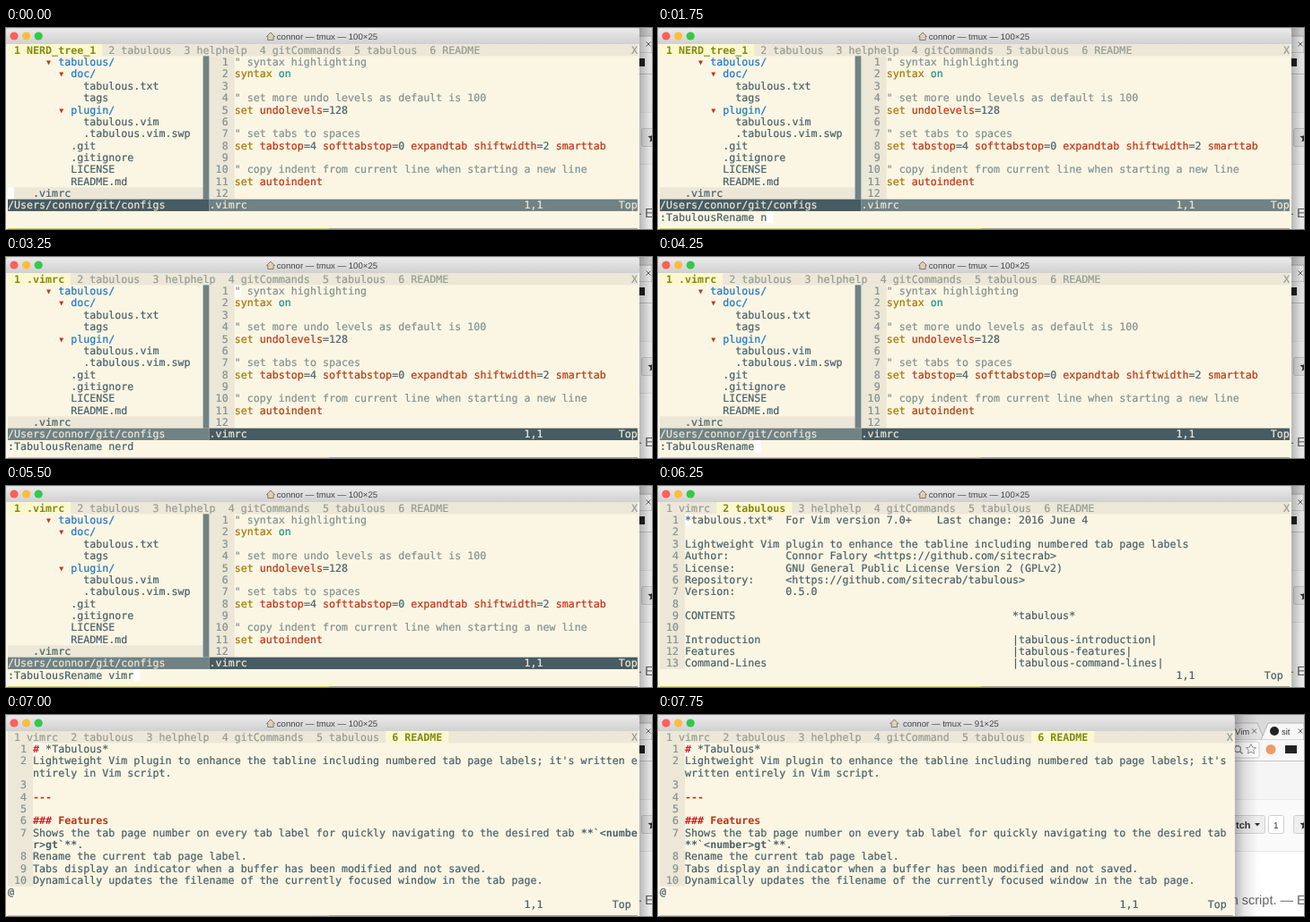
Recreate the animation shown at these times as an HTML page. Size 720 px wide and 225 px high, loop 8 s.

```html
<!DOCTYPE html>
<html lang="en">
<head>
<meta charset="utf-8">
<title>Tab labels in a terminal editor</title>
<style>
  html, body { margin: 0; width: 100%; height: 100%; overflow: hidden; background: #ececec; }
  svg { display: block; width: 720px; height: 225px; }
  text { white-space: pre; text-rendering: geometricPrecision; }
  .mono { font: 11.66px "DejaVu Sans Mono", monospace; stroke-width: .22px; }
  .bold { font-weight: bold; stroke-width: 0; }
  .ui { font-family: "Liberation Sans", sans-serif; }
</style>
</head>
<body>
<svg viewBox="0 0 720 225" xmlns="http://www.w3.org/2000/svg">
  <defs>
    <linearGradient id="bar" x1="0" y1="0" x2="0" y2="1">
      <stop offset="0" stop-color="#ebebeb"/><stop offset="1" stop-color="#d0d0d0"/>
    </linearGradient>
    <linearGradient id="shade">
      <stop offset="0" stop-opacity=".28"/><stop offset=".4" stop-opacity=".1"/><stop offset="1" stop-opacity="0"/>
    </linearGradient>
  </defs>
  <g id="browser" class="ui">
    <rect width="720" height="225" fill="#fff"/>
    <rect width="720" height="28" fill="#dadada"/>
    <path d="M600 28L606 9H668L676 28Z" fill="#e4e4e4" stroke="#b4b4b4"/>
    <path d="M672 28L680 9H720V28Z" fill="#f7f7f7" stroke="#b4b4b4"/>
    <rect y="28" width="720" height="24" fill="#f7f7f7"/>
    <text x="643" y="21.500" font-size="9.500" fill="#444">Vim</text>
    <circle cx="687" cy="18" r="5" fill="#222"/>
    <text x="695" y="21.500" font-size="9.500" fill="#333">sit</text>
    <path d="M662 15.500l5 5m0-5l-5 5M713.500 15.500l5 5m0-5l-5 5" stroke="#666" fill="none"/>
    <rect x="600" y="30" width="70" height="18" rx="2" fill="#fff" stroke="#ccc"/>
    <circle cx="646" cy="38" r="3.500" fill="none" stroke="#888" stroke-width="1.300"/>
    <path d="M648.500 40.500l3 3" stroke="#888" stroke-width="1.500"/>
    <path d="M661 32.500l1.700 3.600 3.900.5-2.900 2.700.8 3.900-3.500-1.900-3.500 1.900.8-3.900-2.900-2.700 3.900-.5z" fill="none" stroke="#999"/>
    <circle cx="683" cy="38.500" r="5.500" fill="#ee9a6a"/>
    <rect x="699" y="34" width="13" height="9" fill="#222"/>
    <rect y="51" width="720" height="1" fill="#c8c8c8"/>
    <rect y="52" width="720" height="42" fill="#f5f5f5"/>
    <rect y="94" width="720" height="58" fill="#fafafa"/>
    <rect y="94" width="720" height="1" fill="#e8e8e8"/>
    <rect y="152" width="720" height="1" fill="#e8e8e8"/>
    <g fill="#eee" stroke="#d0d0d0">
      <rect x="620.500" y="112.500" width="56" height="20" rx="2"/>
      <rect x="680.500" y="112.500" width="17" height="20" rx="2" fill="#fff"/>
      <rect x="708.500" y="112.500" width="30" height="20" rx="2"/>
    </g>
    <text x="644" y="126.500" font-size="11" font-weight="bold" fill="#333">tch</text>
    <path d="M665 121h6l-3 3.500z" fill="#333"/>
    <text x="686" y="126.500" font-size="10" fill="#333">1</text>
    <path d="M721 117l1.600 3.800 4 .3-3 2.700.9 4-3.500-2.200-3.500 2.200.9-4-3-2.700 4-.3z" fill="#333"/>
    <text x="712" y="211.500" font-size="14.500" fill="#666" text-anchor="end">n script. — </text>
    <text x="712" y="211.500" font-size="14.500" fill="#666">E</text>
  </g>
  <g id="win"></g>
</svg>
<script>
const CW = 7.019, RH = 13.36, LEFT = 2, TOP = 18;
const C = {
  paper: '#fbf6e4', shade: '#ece7d7', text: '#4b6269', dim: '#849291', tab: '#959d95',
  yellow: '#a57706', red: '#d11c24', orange: '#bd3613', blue: '#2176c7', cyan: '#259286',
  olive: '#858a10', sel: '#fbf8d0', on: '#475b62', off: '#708284', cursor: '#ffffff'
};
const STEP = 250, STEPS = 32, CMD = ':TabulousRename';
const win = document.getElementById('win');

const esc = s => s.replace(/&/g, '&amp;').replace(/</g, '&lt;');
const colX = c => LEFT + c * CW;
const rowY = r => TOP + r * RH;
const rect = (x, y, w, h, fill) => `<rect x="${x}" y="${y}" width="${w}" height="${h}" fill="${fill}"/>`;
const cell = (c, r, n, fill, rows = 1) => rect(colX(c), rowY(r), n * CW, RH * rows, fill);
const put = (c, r, s, fill = C.text, bold = false) =>
  `<text class="mono${bold ? ' bold' : ''}" x="${colX(c)}" y="${rowY(r) + 10.7}" fill="${fill}" stroke="${fill}">${esc(s)}</text>`;

// Each tree entry: column, label, is it a folder
const tree = [
  [8, 'tabulous/', 1], [10, 'doc/', 1], [12, 'tabulous.txt'], [12, 'tags'],
  [10, 'plugin/', 1], [12, 'tabulous.vim'], [12, '.tabulous.vim.swp'], [10, '.git'],
  [10, '.gitignore'], [10, 'LICENSE'], [10, 'README.md'], [4, '.vimrc']
];
const vimrc = [
  '" syntax highlighting', 'syntax on', '', '" set more undo levels as default is 100',
  'set undolevels=128', '', '" set tabs to spaces',
  'set tabstop=4 softtabstop=0 expandtab shiftwidth=2 smarttab', '',
  '" copy indent from current line when starting a new line', 'set autoindent', ''
];
const entry = (a, b) => a.padEnd(52) + b;
const field = (a, b) => a.padEnd(16) + b;
const help = [
  '*tabulous.txt*  For Vim version 7.0+    Last change: 2016 June 4', '',
  'Lightweight Vim plugin to enhance the tabline including numbered tab page labels',
  field('Author:', 'Connor Falory <https://github.com/sitecrab>'),
  field('License:', 'GNU General Public License Version 2 (GPLv2)'),
  field('Repository:', '<https://github.com/sitecrab/tabulous>'),
  field('Version:', '0.5.0'), '',
  entry('CONTENTS', '*tabulous*'), '',
  entry('Introduction', '|tabulous-introduction|'),
  entry('Features', '|tabulous-features|'),
  entry('Command-Lines', '|tabulous-command-lines|')
];
const readme = [
  '# *Tabulous*',
  "Lightweight Vim plugin to enhance the tabline including numbered tab page labels; it's written entirely in Vim script.",
  '', '---', '', '### Features',
  'Shows the tab page number on every tab label for quickly navigating to the desired tab **`<number>gt`**.',
  'Rename the current tab page label.',
  'Tabs display an indicator when a buffer has been modified and not saved.',
  'Dynamically updates the filename of the currently focused window in the tab page.'
];

function stateAt(n) {
  const s = { cols: 100, tab: 1, label: 'NERD_tree_1', cmd: '', focus: 'tree' };
  const type = (k, head, arg) => k <= head ? CMD.slice(0, k) : CMD + arg.slice(0, k - head - 1);
  if (n > 0) s.cmd = n < 14 ? type(n, 4, ' nerd') : type(n - 13, 3, ' vimrc');
  if (n >= 11) s.label = 'nerd';
  if (n >= 13) s.label = '.vimrc';
  if (n >= 24) s.label = 'vimrc';
  s.right = n >= 13;
  if (n >= 13) s.focus = 'edit';
  if ((n >= 1 && n <= 10) || (n >= 14 && n <= 23)) s.focus = 'cmd';
  if (n >= 25) s.tab = [2, 3, 5, 6][Math.min(n - 25, 3)];
  if (n >= 29) s.cols = [98, 94, 91][n - 29];
  return s;
}

function frame(s) {
  const w = s.cols * CW + 4, mid = w / 2;
  const house = `<path d="M${mid - 62.500} 9.500l4.500-4.500 4.500 4.500h-1.300v4h-6.400v-4z" ` +
    'fill="#dccfbb" stroke="#83705a" stroke-width=".9"/>';
  const lights = ['#fc605b', '#fdbc40', '#34c84a'].map((c, i) =>
    `<circle cx="${9 + i * 13.6}" cy="9" r="4.600" fill="${c}"/>`).join('');
  const half = colX(Math.floor(s.cols / 2) + 1);
  return rect(w, 0, 26, 225, 'url(#shade)') +
    `<path d="M0 ${TOP}V5Q0 .5 5 .5H${w - 5}Q${w} .5 ${w} 5V${TOP}Z" fill="url(#bar)"/>` +
    rect(0, TOP, w, 225 - TOP, C.paper) + lights + house +
    `<text class="ui" x="${mid + 5}" y="12.600" font-size="9.600" text-anchor="middle" fill="#444">` +
    `connor — tmux — ${s.cols}×25</text>` +
    rect(LEFT, 224, half - LEFT, 1, '#d8cd72') + rect(half, 224, w - half - 2, 1, '#a9a58e');
}

function tabs(s) {
  const max = Math.floor(s.cols / 6) - 5;
  let out = cell(0, 0, s.cols, C.shade), c = 0;
  [s.label, 'tabulous', 'helphelp', 'gitCommands', 'tabulous', 'README'].forEach((name, i) => {
    const label = `${i + 1} ${name.slice(0, max)}`, on = s.tab === i + 1;
    const n = label.length + 2;
    if (on) out += cell(c, 0, n, C.sel);
    out += put(c + 1, 0, label, on ? C.olive : C.tab, on);
    c += n;
  });
  return out + put(s.cols - 1, 0, 'X', C.tab);
}

const lineNo = (c, r, n) => put(c, r, String(n).padStart(3), C.dim);

function vimLine(c, r, s) {
  if (s[0] === '"') return put(c, r, s, C.dim);
  let out = '';
  s.replace(/=\d+|\w+/g, (word, at) => {
    const fill = at === 0 ? C.yellow : word === 'on' ? C.cyan : word[0] === '=' ? C.text : C.orange;
    out += put(c + at, r, word, fill);
  });
  return out;
}

function split(s) {
  let out = cell(0, 12, 31, C.shade) + cell(31, 1, 1, C.off, 12) + cell(32, 1, 4, C.shade, 12);
  if (s.focus === 'tree') out += cell(0, 12, 1, C.cursor);
  if (s.focus === 'edit') out += cell(36, 1, 1, C.cursor);
  tree.forEach(([c, name, dir], i) => {
    if (dir) out += put(c - 2, i + 1, '▾', C.orange);
    out += put(c, i + 1, name, dir ? C.blue : C.text);
  });
  vimrc.forEach((line, i) => { out += lineNo(32, i + 1, i + 1) + vimLine(36, i + 1, line); });
  out += cell(0, 13, 32, s.right ? C.off : C.on) + cell(32, 13, 68, s.right ? C.on : C.off);
  out += put(0, 13, '/Users/connor/git/configs', C.shade) + put(32, 13, '.vimrc', C.shade) +
    put(82, 13, '1,1', C.shade) + put(97, 13, 'Top', C.shade);
  if (s.focus === 'cmd') out += cell(s.cmd.length, 14, 1, C.cursor);
  return out + put(0, 14, s.cmd);
}

function docLine(r, s, md) {
  if (!md) return put(4, r, s);
  if (s === '---') return put(4, r, s, C.orange, true);
  if (s.startsWith('###')) return put(4, r, '###', C.red, true) + put(8, r, s.slice(4), C.orange, true);
  if (s[0] === '#') return put(4, r, '#', C.red, true) + put(6, r, s.slice(2));
  const a = s.search(/\*\*`|r>gt/);
  if (a < 0) return put(4, r, s);
  return put(4, r, s.slice(0, a)) + put(4 + a, r, s.slice(a).replace(/\.$/, ''), C.text, true) +
    (s.endsWith('.') ? put(3 + s.length, r, '.') : '');
}

function page(s) {
  const md = s.tab === 6, wide = s.cols - 4;
  let r = 1, out = cell(0, 1, 4, C.shade, md ? 12 : 13) + cell(4, 1, 1, C.cursor);
  (md ? readme : help).forEach((line, i) => {
    out += lineNo(0, r, i + 1);
    for (let p = 0; p === 0 || p < line.length; p += wide) out += docLine(r++, line.slice(p, p + wide), md);
  });
  if (md) out += put(0, 13, '@');
  return out + put(s.cols - 18, 14, '1,1') + put(s.cols - 4, 14, 'Top');
}

let last = -1;
const start = performance.now();
function draw(now) {
  const n = Math.floor(Math.max(0, now - start) / STEP) % STEPS;
  if (n !== last) {
    const s = stateAt(n);
    win.innerHTML = frame(s) + tabs(s) + (s.tab === 1 ? split(s) : page(s));
    last = n;
  }
  requestAnimationFrame(draw);
}
draw(start);
</script>
</body>
</html>
```
